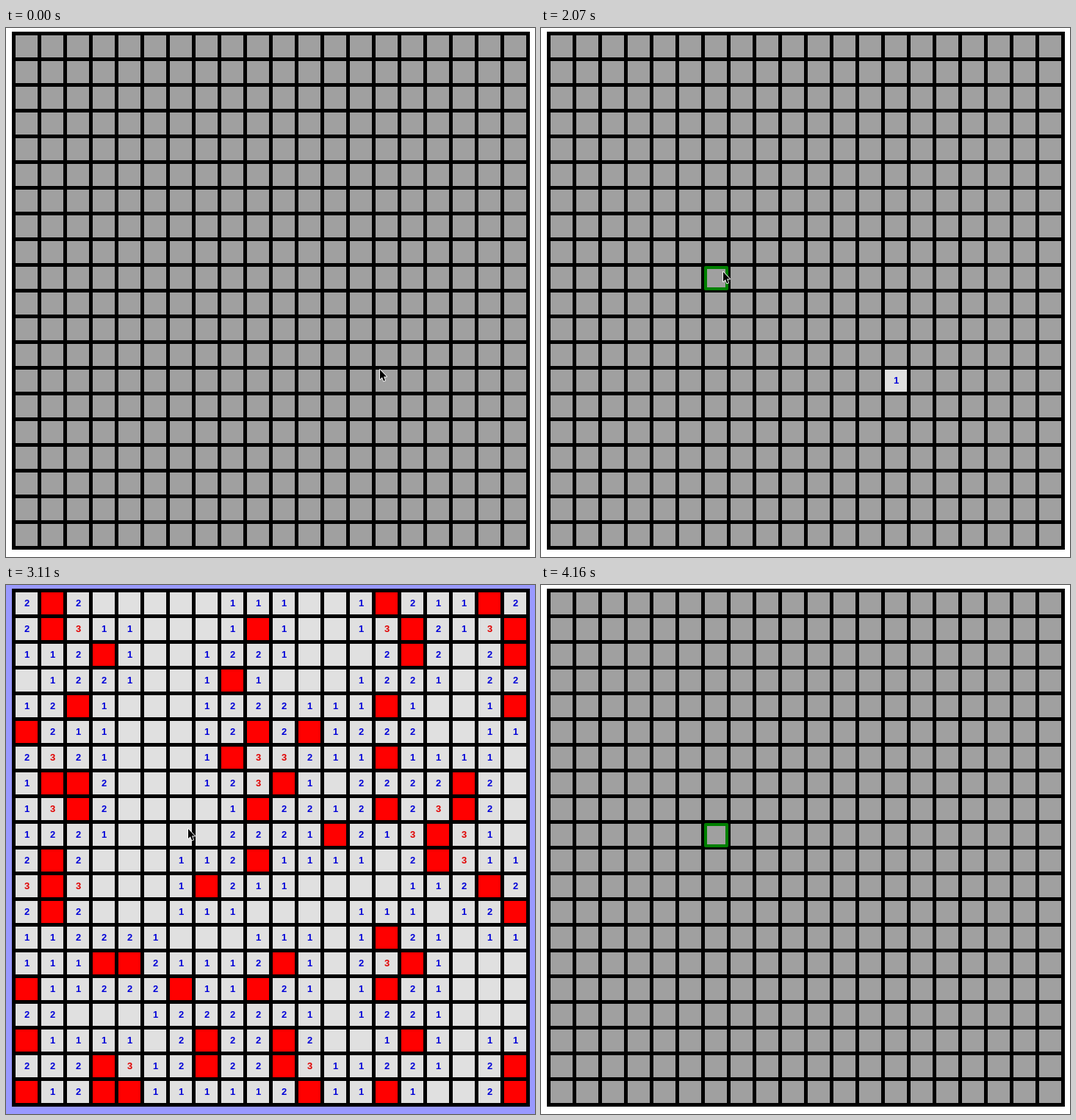
An HTML page with a canvas for the animation above (4600 ms loop, 720x720 px).

```html
<!DOCTYPE html>
<html>
<head>
<meta charset="utf-8">
<title>Self-solving minefield</title>
<style>
  html, body { margin: 0; width: 100%; height: 100%; overflow: hidden; background: #fff; }
  canvas { display: block; }
</style>
</head>
<body>
<canvas id="stage" width="720" height="720"></canvas>
<script>
const ctx = document.getElementById('stage').getContext('2d');
const SIZE = 20, PITCH = 35, CELL = 30, LEFT = 13, TOP = 10;
const LOOP = 4600, SOLVE_START = 2220, WIN = 2960, RESET = 3860;
const PASSES_PER_STEP = 3;
const HIDDEN = 0, OPEN = 1, MARKED = 2;

// Moments at which the picture may change.
const STEPS = [0, 150, 290, 440, 740, 1180, 1330, 1930, 2070, 2220, 2370, 2520, 2670,
  2820, 2960, 3110, 3260, 3410, 3560, 3710, 3860, 4010, 4160];

// Cursor positions: start time, x, y.
const CURSOR = [[0, 507, 464], [150, 501, 452], [290, 477, 462], [440, 474, 464],
  [1180, 317, 431], [1330, 244, 331], [1930, 245, 331], [2070, 246, 331], [4010, 491, 518]];
const CURSOR_END = 4160;

const MINES = [
  '.*............*...*.',
  '.*.......*.....*...*',
  '...*...........*...*',
  '........*...........',
  '..*...........*....*',
  '*........*.*........',
  '........*.....*.....',
  '.**.......*......*..',
  '..*......*....*..*..',
  '............*...*...',
  '.*.......*......*...',
  '.*.....*..........*.',
  '.*.................*',
  '..............*.....',
  '...**.....*....*....',
  '*.....*..*....*.....',
  '....................',
  '*......*..*....*....',
  '...*...*..*........*',
  '*..**......*..*....*'
].join('');

const index = (row, col) => row * SIZE + col;
const FIRST = index(13, 13), SECOND = index(9, 6);

const neighbours = Array.from(MINES, (_, i) => {
  const row = Math.floor(i / SIZE), col = i % SIZE, list = [];
  for (let r = Math.max(0, row - 1); r <= Math.min(SIZE - 1, row + 1); r++)
    for (let c = Math.max(0, col - 1); c <= Math.min(SIZE - 1, col + 1); c++)
      if (r !== row || c !== col) list.push(index(r, c));
  return list;
});
const counts = neighbours.map(list => list.filter(n => MINES[n] === '*').length);

function flood(state, start) {
  const stack = [start];
  while (stack.length) {
    const i = stack.pop();
    if (state[i] === OPEN) continue;
    state[i] = OPEN;
    if (!counts[i]) stack.push(...neighbours[i]);
  }
  return state;
}

// One pass: every open number judges its neighbours from the previous state.
function solve(state) {
  const next = state.slice();
  state.forEach((s, i) => {
    if (s !== OPEN) return;
    const hidden = neighbours[i].filter(n => state[n] === HIDDEN);
    const left = counts[i] - neighbours[i].filter(n => state[n] === MARKED).length;
    if (left === 0) hidden.forEach(n => next[n] = OPEN);
    else if (left === hidden.length) hidden.forEach(n => next[n] = MARKED);
  });
  return next;
}

const blank = new Array(SIZE * SIZE).fill(HIDDEN);
const opened = blank.slice();
opened[FIRST] = OPEN;
const passes = [flood(opened.slice(), SECOND)];
while (passes.length < 40) passes.push(solve(passes[passes.length - 1]));

function boardAt(t) {
  if (t < 740 || t >= RESET) return blank;
  if (t < SOLVE_START) return opened;
  const step = STEPS.indexOf(t) - STEPS.indexOf(SOLVE_START) + 1;
  return passes[Math.min(step * PASSES_PER_STEP, passes.length - 1)];
}

function backgroundAt(t) {
  if (t < WIN || t >= RESET) return '#fff';
  const level = Math.round(153 + 26 * (t - 3110) / 600);
  return `rgb(${level},${level},255)`;
}

function drawCell(i, state) {
  const x = LEFT + PITCH * (i % SIZE), y = TOP + PITCH * Math.floor(i / SIZE);
  ctx.fillStyle = ['#a0a0a0', '#e0e0e0', '#f00'][state];
  ctx.fillRect(x, y, CELL, CELL);
  if (state === OPEN && counts[i]) {
    ctx.fillStyle = counts[i] < 3 ? '#0000d8' : '#e00000';
    ctx.fillText(counts[i], x + CELL / 2 + 0.5, y + 19);
  }
}

function drawFocus() {
  ctx.strokeStyle = '#008000';
  ctx.lineWidth = 4;
  ctx.strokeRect(224, 326, 29, 29);
}

const arrow = new Path2D('M2 1V14L5 11.3L7 16.5L9 15.6L7 10.6H11Z');
function drawCursor(x, y) {
  ctx.save();
  ctx.translate(x, y);
  ctx.strokeStyle = '#fff';
  ctx.lineWidth = 1.8;
  ctx.stroke(arrow);
  ctx.fillStyle = '#000';
  ctx.fill(arrow);
  ctx.restore();
}

function draw(t) {
  ctx.fillStyle = backgroundAt(t);
  ctx.fillRect(0, 0, 720, 720);
  ctx.fillStyle = '#000';
  ctx.fillRect(8, 5, 705, 705);
  ctx.font = 'bold 13px "Liberation Sans", Arial, sans-serif';
  ctx.textAlign = 'center';
  ctx.lineJoin = 'round';
  boardAt(t).forEach((state, i) => drawCell(i, state));
  if (t === 2070 || t >= RESET) drawFocus();
  if (t < CURSOR_END) {
    const [, x, y] = CURSOR.filter(([start]) => start <= t).pop();
    drawCursor(x, y);
  }
}

const started = performance.now();
function tick() {
  const t = (performance.now() - started) % LOOP;
  draw(STEPS.filter(start => start <= t).pop());
  requestAnimationFrame(tick);
}
tick();
</script>
</body>
</html>
```
